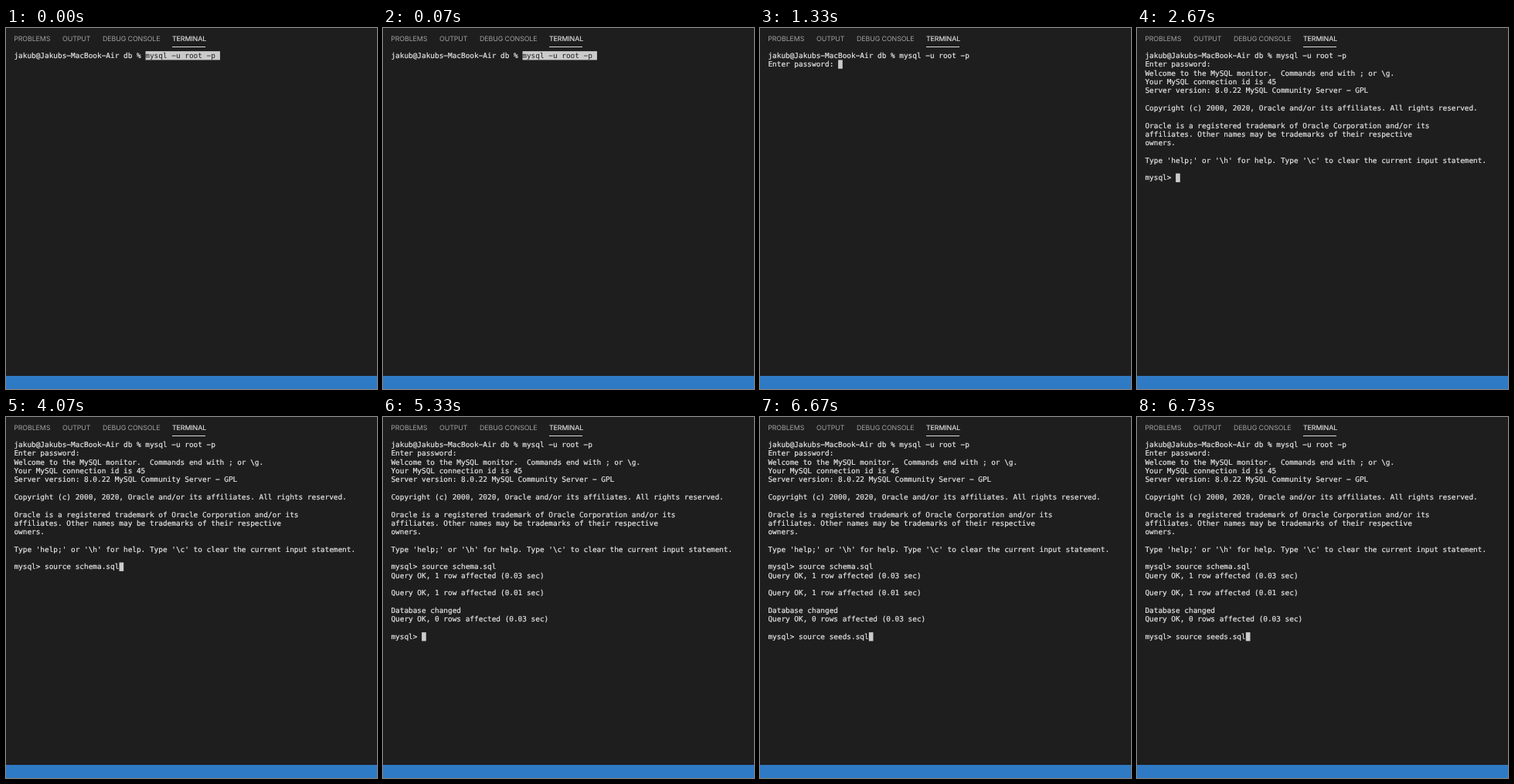
These frames come from a looping animation (480x468 px, 8000 ms). An HTML page:

```html
<!DOCTYPE html>
<html lang="en">
<head>
<meta charset="utf-8">
<title>Terminal</title>
<style>
  html, body { margin: 0; width: 100%; height: 100%; overflow: hidden; background: #1e1e1e; }
  svg { display: block; width: 480px; height: 468px; background: #1e1e1e; }
  text { white-space: pre; text-rendering: geometricPrecision; }
  .tab { font: 8.85px Inter, Roboto, sans-serif; letter-spacing: -.1px; fill: #a0a0a0; }
  .tab.active { fill: #ebebeb; stroke: #ebebeb; stroke-width: .12px; }
  #screen text { font: 9.42px "DejaVu Sans Mono", monospace; fill: #e6e6e6; stroke: #e6e6e6; stroke-width: .2px; }
  #screen tspan { fill: #1e1e1e; stroke: none; }
  #screen rect { fill: #cbcbcb; }
</style>
</head>
<body>
<svg viewBox="0 0 480 468">
  <text class="tab" x="10.2" y="17">PROBLEMS</text>
  <text class="tab" x="73" y="17">OUTPUT</text>
  <text class="tab" x="125" y="17">DEBUG CONSOLE</text>
  <text class="tab active" x="215" y="17">TERMINAL</text>
  <rect x="215" y="24" width="43" height="1" fill="#dcdcdc"/>
  <g id="screen"></g>
  <rect y="451" width="480" height="17" fill="#2f7ac5"/>
</svg>
<script>
const LOOP = 8000;
const LEFT = 10.4, TOP = 30.1, ROW = 11.32, CELL = 5.671, BASELINE = 8.9;

const shell = 'jakub@Jakubs-MacBook-Air db % ';
const login = 'mysql -u root -p';
const password = shell + login + '\nEnter password: ';
const welcome = password + String.raw`
Welcome to the MySQL monitor.  Commands end with ; or \g.
Your MySQL connection id is 45
Server version: 8.0.22 MySQL Community Server - GPL

Copyright (c) 2000, 2020, Oracle and/or its affiliates. All rights reserved.

Oracle is a registered trademark of Oracle Corporation and/or its
affiliates. Other names may be trademarks of their respective
owners.

Type 'help;' or '\h' for help. Type '\c' to clear the current input statement.

mysql> `;
const schema = welcome + 'source schema.sql';
const created = schema + `
Query OK, 1 row affected (0.03 sec)

Query OK, 1 row affected (0.01 sec)

Database changed
Query OK, 0 rows affected (0.03 sec)

mysql> `;
const seeds = created + 'source seeds.sql';

// start time, plain text, inverted text (cursor or pasted command)
const steps = [
  [0, shell, login + ' '],
  [1330, password, ' '],
  [2670, welcome, ' '],
  [4000, schema, ' '],
  [5330, created, ' '],
  [6670, seeds, ' '],
];

const screen = document.getElementById('screen');
const wideDash = s => s.replace(/-/g, '\u2212');
let shown = null;

function make(tag, attrs, text = '') {
  const el = document.createElementNS('http://www.w3.org/2000/svg', tag);
  for (const key in attrs) el.setAttribute(key, attrs[key]);
  el.textContent = wideDash(text);
  return el;
}

function show([, plain, inverted]) {
  const lines = plain.split('\n');
  const last = lines.length - 1;
  const rows = lines.map((line, i) =>
    make('text', { x: LEFT, y: TOP + i * ROW + BASELINE }, line));
  rows[last].append(make('tspan', {}, inverted));
  const block = make('rect', {
    x: LEFT + lines[last].length * CELL,
    y: TOP + last * ROW,
    width: inverted.length * CELL,
    height: ROW,
  });
  screen.replaceChildren(block, ...rows);
}

function draw(now) {
  const t = now % LOOP;
  const step = steps.findLast(s => s[0] <= t);
  if (step !== shown) show(shown = step);
}

const start = performance.now();
function tick() {
  draw(performance.now() - start);
  requestAnimationFrame(tick);
}
tick();
</script>
</body>
</html>
```
